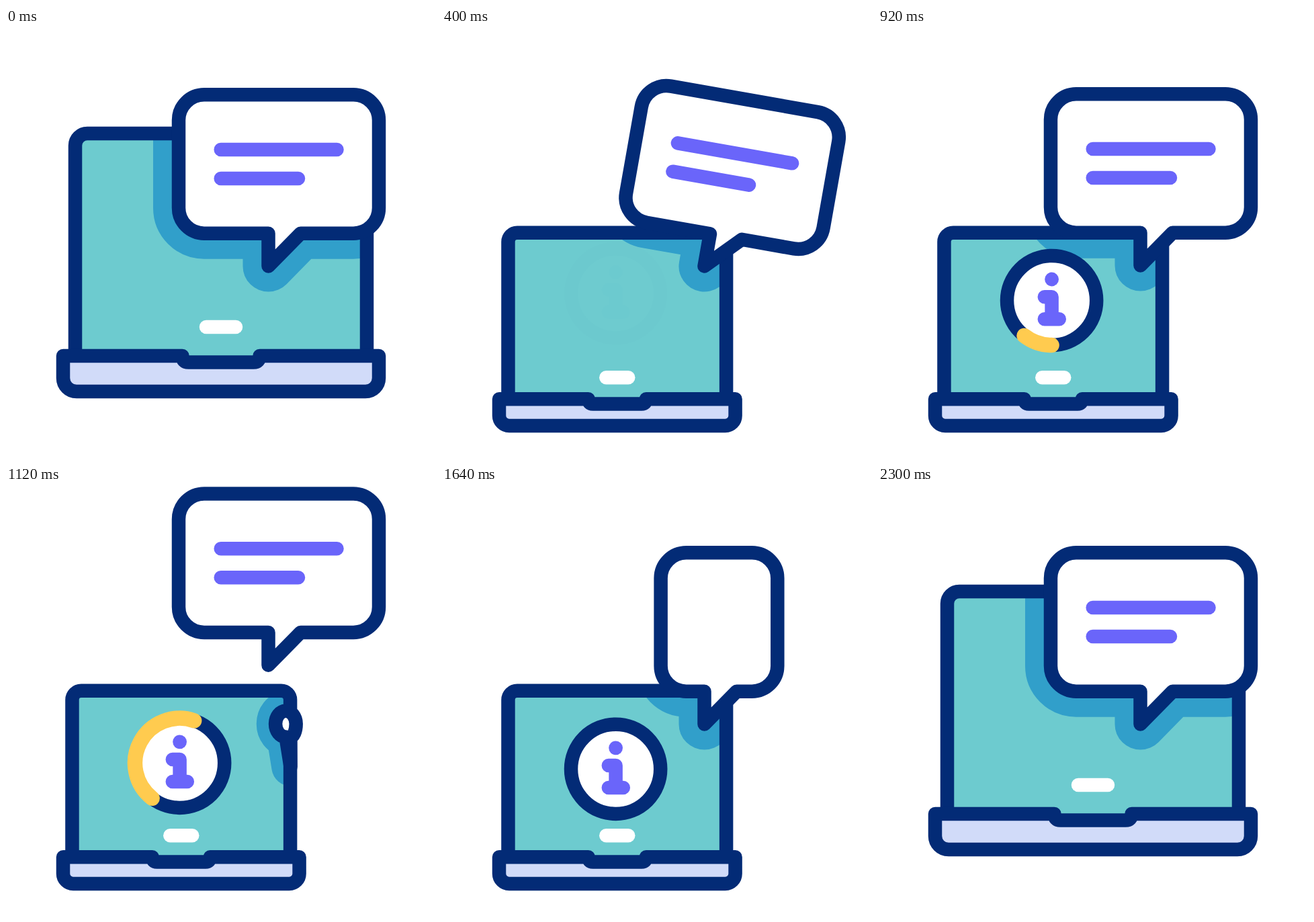
An HTML page for the animation above (2.4 s loop, 640 px wide and 640 px high).

```html
<!DOCTYPE html>
<html lang="en">
<head>
<meta charset="utf-8">
<title>Laptop message</title>
<style>
  html, body { margin: 0; width: 100%; height: 100%; overflow: hidden; background: #fff; }
  svg { display: block; width: 100vw; height: 100vh; }
  path, line, circle { stroke-linecap: round; stroke-linejoin: round; stroke-width: 20.5; fill: none; }
  .laptop { vector-effect: non-scaling-stroke; }
  .navy { stroke: #032b76; }
  .white { fill: #fff; }
  .teal { fill: #6dcbcf; }
  .tray { fill: #d1dbf9; }
  .dash { stroke: #fff; }
  .violet { stroke: #6a65fa; }
  .dot { fill: #6a65fa; }
  .shade { fill: #319fca; stroke: #319fca; }
  .arc { stroke: #ffcb4f; stroke-width: 22.5; }
</style>
</head>
<body>
<svg viewBox="0 0 640 640">
  <defs>
    <clipPath id="screen">
      <path class="laptop" d="M103 488V175a18 18 0 0 1 18-18H519a18 18 0 0 1 18 18V488Z"/>
    </clipPath>
  </defs>
  <path class="laptop teal" d="M103 488V175a18 18 0 0 1 18-18H519a18 18 0 0 1 18 18V488Z"/>
  <g clip-path="url(#screen)">
    <path id="oldShade" class="shade"/>
    <path id="newShade" class="shade"/>
  </g>
  <path class="laptop navy" d="M103 488V175a18 18 0 0 1 18-18H519a18 18 0 0 1 18 18V488"/>
  <path class="laptop navy tray" d="M85 488H262.5q0 9.5 9 9.5H368.5q9 0 9-9.5H555V521a20 20 0 0 1-20 20H105a20 20 0 0 1-20-20Z"/>
  <path class="laptop dash" d="M298 445H342"/>
  <g id="info">
    <circle class="navy white" r="66.6"/>
    <path id="arc" class="arc"/>
    <circle class="dot" cy="-31.5" r="10.4"/>
    <path class="violet" d="M-10.8-5.3H0V27.7M-10.8 27.7H11.2"/>
  </g>
  <g id="oldBubble">
    <path id="oldBody" class="navy white"/>
    <path class="violet" d="M319.7 181H492.5M319.7 224H435"/>
  </g>
  <g id="newBubble">
    <path id="newBody" class="navy white"/>
    <line id="line1" class="violet" x1="319.7" y1="181" y2="181"/>
    <line id="line2" class="violet" x1="319.7" y1="224" y2="224"/>
  </g>
</svg>
<script>
const LOOP = 2400;
const $ = id => document.getElementById(id);
const set = (el, attrs) => { for (const k in attrs) el.setAttribute(k, attrs[k]); };
const show = (el, on) => { el.style.display = on ? '' : 'none'; };
const ramp = (t, a, b) => Math.min(1, Math.max(0, (t - a) / (b - a)));
const ease = (t, a, b) => { const u = ramp(t, a, b); return u * u * (3 - 2 * u); };
const mix = (a, b, u) => a.map((v, i) => v + (b[i] - v) * u);

// left, right, top, bottom, tail left, tail right, tip x, tip y
const SEED = [409, 424.5, 362.5, 381.5, 419.5, 421.5, 427.5, 425.5];
const TALL = [334, 492.5, 99.3, 305.7, 390.5, 438.5, 390.5, 354.5];
const WIDE = [257, 555, 99.3, 305.7, 390.5, 438.5, 390.5, 354.5];

function bubblePath([l, r, t, b, tl, tr, x, y]) {
  const top = Math.min(38, (r - l) / 2);
  const left = Math.min(38, tl - l), right = Math.min(38, r - tr);
  const v = Math.min(38, (b - t) / 2);
  const arc = (rx, dx, dy) => `a${rx} ${v} 0 0 1 ${dx} ${dy}`;
  return `M${l + top} ${t}H${r - top}${arc(top, top, v)}V${b - v}${arc(right, -right, v)}` +
    `H${tr}L${x} ${y}L${tl} ${b}H${l + left}${arc(left, -left, -v)}V${t + v}${arc(top, top, -v)}Z`;
}

// Turns are measured clockwise from the bottom of the ring.
function arcPath(from, to) {
  const r = 66.6;
  const at = u => {
    const a = Math.PI * (0.5 + 2 * u);
    return `${r * Math.cos(a)} ${r * Math.sin(a)}`;
  };
  return `M${at(from)}A${r} ${r} 0 ${to - from > 0.5 ? 1 : 0} 1 ${at(to)}`;
}

function drawLaptop(t) {
  const p = ease(t, 100, 300) - ease(t, 2100, 2300);
  const transform = `translate(85 ${540.8 + 51 * p}) scale(${1 - 0.252 * p}) translate(-85 -540.8)`;
  document.querySelectorAll('.laptop').forEach(el => set(el, { transform }));
}

function drawOldBubble(t) {
  const on = t < 1600;
  const turn = 10 * (ease(t, 100, 400) - ease(t, 400, 600));
  const transform = `translate(0 ${-372 * ease(t, 900, 1600)}) rotate(${turn} 390.5 354.5)`;
  for (const el of [$('oldBubble'), $('oldShade')]) {
    show(el, on);
    set(el, { transform });
  }
}

function drawLine(el, length, u) {
  show(el, u > 0);
  set(el, { x2: 319.7 + length * u });
}

function drawNewBubble(t) {
  const on = t > 1000;
  const tall = mix(SEED, TALL, ease(t, 1000, 1600));
  const d = bubblePath(mix(tall, WIDE, ease(t, 1600, 1800)));
  set($('newBody'), { d });
  set($('newShade'), { d });
  $('newShade').style.strokeWidth = 20 + 56 * ease(t, 1000, 1200);
  show($('newBubble'), on);
  show($('newShade'), on);
  drawLine($('line1'), 172.8, ease(t, 1800, 2100));
  drawLine($('line2'), 115.3, ease(t, 2000, 2300));
}

function drawInfo(t) {
  const y = 408.2 + 13.2 * Math.cos(2 * Math.PI * (t - 1600) / LOOP);
  const opacity = ramp(t, 400, 600) - ramp(t, 1800, 2000);
  set($('info'), { transform: `translate(258.6 ${y})`, opacity });
  const from = ease(t, 1000, 1600), to = ease(t, 800, 1400);
  show($('arc'), to > from);
  set($('arc'), { d: arcPath(from, to) });
}

function draw(t) {
  drawLaptop(t);
  drawOldBubble(t);
  drawNewBubble(t);
  drawInfo(t);
}

set($('oldBody'), { d: bubblePath(WIDE) });
set($('oldShade'), { d: bubblePath(WIDE) });
$('oldShade').style.strokeWidth = 76;

const start = performance.now();
function tick(now) {
  draw(Math.max(0, now - start) % LOOP);
  requestAnimationFrame(tick);
}
draw(0);
requestAnimationFrame(tick);
</script>
</body>
</html>
```
